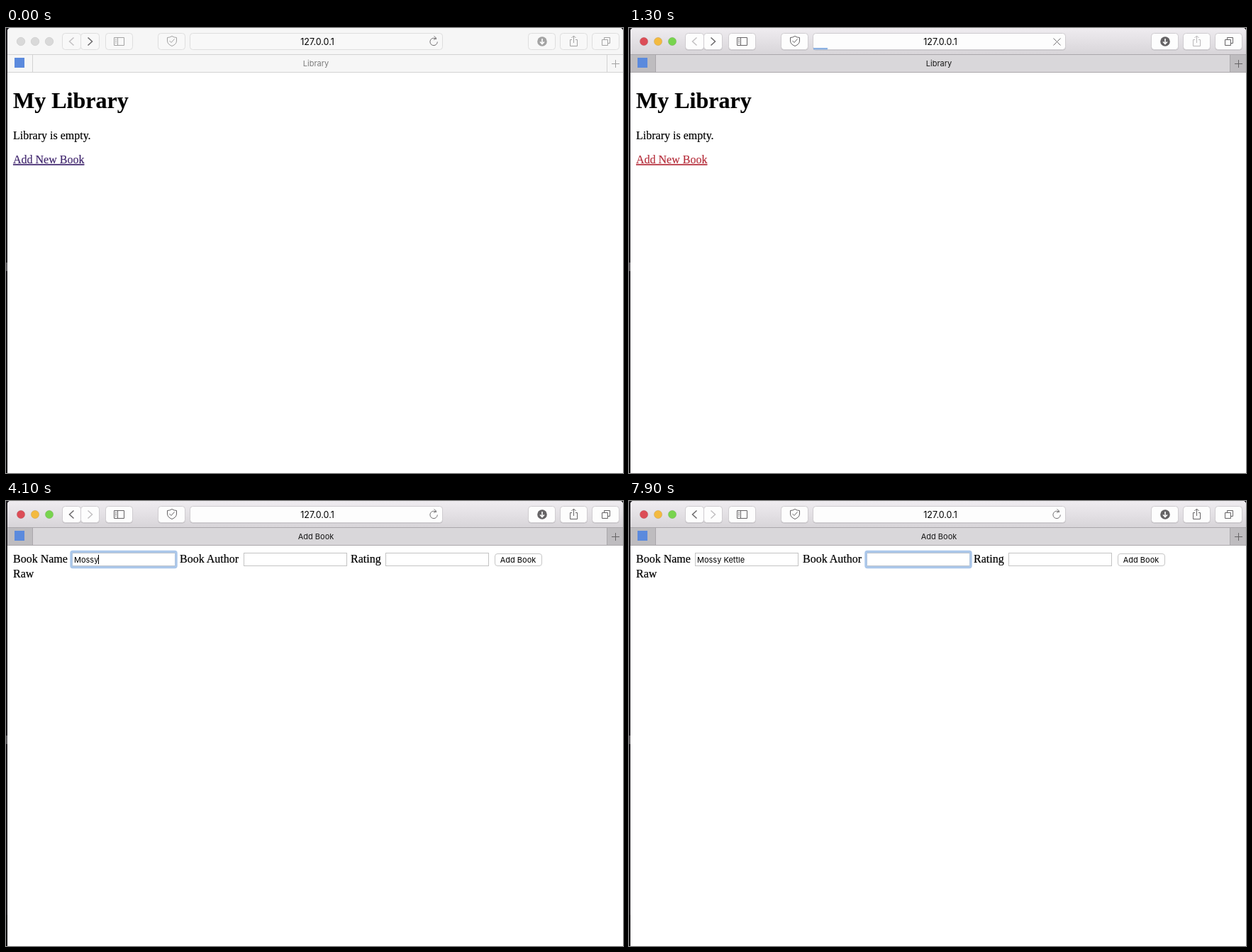
An HTML page that plays this animation: 870x628 px, repeating every 8000 ms.

```html
<!DOCTYPE html>
<html lang="en">
<head>
<meta charset="utf-8">
<title>Library</title>
<style>
  html, body { margin: 0; width: 100%; height: 100%; overflow: hidden; background: #fff; }
  svg { display: block; width: 870px; height: 628px; --ico: #a3a3a3; --dim: #bdbdbd; --edge: #dedede; --line: #d2d2d2; --btn: #f8f8f8; }
  svg.live { --ico: #656365; --dim: #b9b7b9; --edge: #cfccd0; --line: #aaa7ab; --btn: #fdfdfd; }
  .ui { font: 11px Inter, Roboto, sans-serif; }
  .page text { font: 16px "Liberation Serif", "Noto Serif", serif; stroke: #000; stroke-width: .2; }
  .page .h1 { font-size: 32px; font-weight: bold; }
  .page .ui { font: 11px Inter, Roboto, sans-serif; stroke: none; }
  .mid { text-anchor: middle; }
  .bar { fill: #f6f6f6; }
  .live .bar { fill: url(#chrome); }
  .tabs, .side { fill: #f6f6f6; }
  .live .tabs { fill: #d9d7da; }
  .live .side { fill: #bebcbf; }
  .line { fill: var(--line); }
  .btn { fill: var(--btn); stroke: var(--edge); }
  .shade { fill: none; }
  .live .shade { fill: #bab7bb; }
  .ico { fill: none; stroke: var(--ico); stroke-width: 1; }
  .ico .solid { fill: var(--ico); stroke: none; }
  .arrow { stroke: #6a686a; stroke-width: 1.5; }
  .arrow.off { stroke: #c2c0c2; }
  .busy .share { stroke: var(--dim); }
  .tab { fill: #7b7b7b; }
  .live .tab { fill: #171717; }
  .light { fill: #d9d9d9; stroke: #cbcbcb; stroke-width: .7; }
  .live .light { fill: var(--c); stroke: #0002; }
  .page .link { fill: #42286f; stroke: #42286f; text-decoration: underline; }
  .page .link.hit { fill: #b6303d; stroke: #b6303d; }
  .field { fill: #fff; stroke: #c3c3c3; }
</style>
</head>
<body>
<svg id="stage" viewBox="0 0 870 628">
  <defs>
    <linearGradient id="chrome" x2="0" y2="1">
      <stop stop-color="#efecf0"/><stop offset="1" stop-color="#d8d5d9"/>
    </linearGradient>
  </defs>
  <rect width="870" height="628" fill="#1c1a1e"/>
  <rect y="584" width="2" height="44" fill="#08070a"/>
  <path d="M2 628V5q0-5 5-5H865q5 0 5 5V628z" fill="#fff"/>
  <rect y="331" width="2" height="12" fill="#5c5a5e"/>

  <path class="bar" d="M2 37V5q0-5 5-5H865q5 0 5 5V37z"/>
  <rect class="tabs" x="2" y="38" width="868" height="24"/>
  <rect class="side" x="2" y="38" width="35" height="24"/>
  <rect class="side" x="848" y="38" width="22" height="24"/>
  <path class="line" d="M2 37h868v1H2zM2 62h868v1H2zM37 38h1v24h-1zM847 38h1v24h-1z"/>
  <rect x="12" y="42" width="14" height="14" fill="#5b8add"/>
  <g id="lights"></g>
  <g id="buttons"></g>

  <path id="back" class="ico arrow" d="M95.500 13.500l-6 5.500 6 5.500"/>
  <path id="next" class="ico arrow" d="M115.500 13.500l6 5.500-6 5.500"/>
  <g class="ico">
    <path d="M152.500 13.500h14v11h-14zM157.500 13.500v11M154 16h2M154 18.500h2M154 21h2"/>
    <path d="M234 11.500q3 2 6.500 2v4.500q0 5-6.500 7.500q-6.500-2.500-6.500-7.500v-4.500q3.500 0 6.500-2zM230.500 18l2.500 2.500 4.500-5"/>
    <circle class="solid" cx="756" cy="19" r="6.800"/>
    <path d="M756 15v7M753 19.500l3 3 3-3" style="stroke:#fff;stroke-width:1.6"/>
    <path d="M843.500 16.500v-3h8v8h-3M840.500 16.500h8v8h-8z"/>
    <path d="M859.500 45v11M854 50.500h11"/>
  </g>
  <path class="ico share" d="M798 16.500h-2.500v9h10v-9h-2.500M800.500 21v-9.500M797.500 14l3-3 3 3"/>
  <g id="reload" class="ico" style="stroke:#737173">
    <path d="M607 16a5.200 5.200 0 1 0 1.300 3.500"/>
    <path d="M603.500 11.500l3.500 3-4 2"/>
  </g>
  <path id="stop" class="ico" style="stroke:#737173" d="M598.500 14.500l10 10M608.500 14.500l-10 10"/>
  <rect id="load" x="260" y="28" height="2.500" fill="#8cb1e2"/>
  <text class="ui mid" x="439" y="24" style="font-size:12.5px">127.0.0.1</text>
  <text id="title" class="ui mid tab" x="437" y="54"></text>

  <g id="home" class="page">
    <text class="h1" x="10" y="113">My Library</text>
    <text x="10" y="157">Library is empty.</text>
    <text id="link" class="link" x="10" y="191">Add New Book</text>
  </g>
  <g id="form" class="page">
    <text x="10" y="87">Book Name</text>
    <text x="245" y="87">Book Author</text>
    <text x="486" y="87">Rating</text>
    <text x="10" y="108">Raw</text>
    <g id="fields"></g>
    <rect id="ring" y="71.500" width="148" height="22" rx="2" fill="none" stroke="#abc7ea" stroke-width="3.400"/>
    <rect x="689.500" y="74.500" width="66" height="17" rx="3.500" fill="#fff" stroke="#c6c6c6"/>
    <text class="ui mid" x="722" y="87">Add Book</text>
    <text id="typed" class="ui" x="96" y="87"></text>
    <rect id="caret" y="76" width="1" height="13"/>
  </g>
</svg>
<script>
const $ = id => document.getElementById(id);
const LOOP = 8000, BOOK = "Mossy Kettle";
const T = { focusWindow: 100, press: 1000, load: 1200, page: 1600, loaded: 1700, field: 1900, author: 7300 };
const KEYS = [2800, 3100, 3400, 3700, 4000, 4300, 4600, 5000, 5300, 5600, 5900, 6300];
const BLINK = 510;

$("lights").innerHTML = ["#dc4d57", "#f3ba40", "#78d44e"].map((c, i) =>
  `<circle class="light" cx="${21 + i * 20}" cy="19" r="5.7" style="--c:${c}"/>`).join("");

// x and width of each toolbar control
$("buttons").innerHTML = [[79, 27], [105, 27], [140, 39], [214, 39], [259, 357], [736, 39], [781, 39], [826, 39]]
  .map(([x, w]) => `<rect class="shade" x="${x}" y="9" width="${w}" height="22.5" rx="4.500"/>
    <rect class="btn" x="${x + .5}" y="7.500" width="${w - 1}" height="23" rx="4"/>`).join("");

$("fields").innerHTML = [93, 335, 535].map(x =>
  `<rect class="field" x="${x + .5}" y="73.500" width="145" height="18"/>`).join("");

const show = (id, on) => { $(id).style.display = on ? "" : "none"; };

function draw(t) {
  const loading = t >= T.load && t < T.loaded;
  const onForm = t >= T.page, inAuthor = t >= T.author;
  const stage = $("stage").classList;
  stage.toggle("live", t >= T.focusWindow);
  stage.toggle("busy", loading);

  show("home", !onForm);
  show("form", onForm);
  show("reload", !loading);
  show("stop", loading);
  show("load", loading);
  $("back").classList.toggle("off", !onForm);
  $("next").classList.toggle("off", onForm);
  $("link").classList.toggle("hit", t >= T.press);
  $("title").textContent = t < T.field ? "Library" : "Add Book";

  // the bar creeps at first, then rushes to the end
  const p = Math.max(0, (t - T.load) / (T.loaded - T.load));
  $("load").setAttribute("width", 20 + 335 * Math.max(0, (p - .2) / .8) ** 2);

  const count = KEYS.filter(k => t >= k).length;
  $("typed").textContent = BOOK.slice(0, count);
  const focused = t >= T.field;
  show("ring", focused);
  $("ring").setAttribute("x", inAuthor ? 334 : 92);

  const since = t - (inAuthor ? T.author : count ? KEYS[count - 1] : T.field);
  show("caret", focused && Math.floor(since / BLINK) % 2 === 0);
  const end = count && onForm ? $("typed").getComputedTextLength() : 0;
  $("caret").setAttribute("x", inAuthor ? 338 : Math.round(96 + end));
}

const start = performance.now();
(function tick() {
  draw((performance.now() - start) % LOOP);
  requestAnimationFrame(tick);
})();
</script>
</body>
</html>
```
